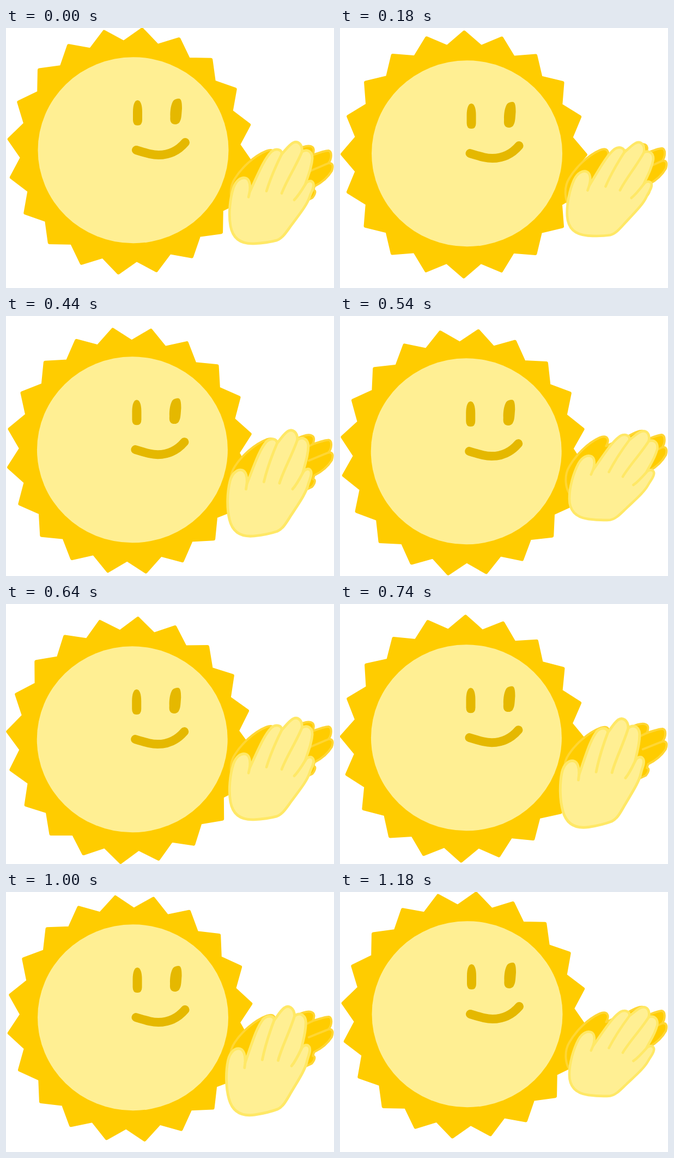
Write an HTML page that moves like this. It is 602x475 px and loops after 1.2 s.

```html
<!DOCTYPE html>
<html lang="en">
<head>
<meta charset="utf-8">
<title>Clapping sun</title>
<style>
  html, body { margin: 0; width: 100%; height: 100%; overflow: hidden; background: #fff; }
  svg { display: block; width: 602px; height: 475px; }
  path, polygon { stroke-linecap: round; stroke-linejoin: round; }
  #rays { fill: #fc0; stroke: #fc0; stroke-width: 6; }
  .face { fill: #ffef93; }
  .eye { fill: #e5b800; }
  .mouth { fill: none; stroke: #e5b800; stroke-width: 16; }
  #back { fill: #fc0; stroke: #ffd633; stroke-width: 4; }
  #front { fill: #ffef93; stroke: #ffe866; stroke-width: 4.8; }
  #back .crease, #front .crease { fill: none; }
</style>
</head>
<body>
<svg viewBox="0 0 602 475">
  <g id="sun">
    <polygon id="rays"/>
    <ellipse class="face" cx="233.5" cy="223.2" rx="175" ry="170"/>
    <path class="eye" d="M241.5 132C247 132 250 141 250 153V168Q250 178 241.5 178Q233 178 233 168V153C233 141 236 132 241.5 132Z"/>
    <path class="eye" d="M317 129C322 129 323 136 323 147C322 160 322 166 319 171C317 176 310 177 306 175C302 173 301 169 301.5 162C301 150 303 139 307 133C310 130 313 129 317 129Z"/>
    <path class="mouth" d="M239 223C262 230 270 232 280 232C300 232 317 223 329 209"/>
  </g>
  <g id="back">
    <path d="M425 333C408 318 410 290 420 275C432 256 455 234 478 225C492 220 497 229 489 241L530 225C540 220 552 214 560 217C566 219 566 225 563 233C574 229 585 225 592 225C599 227 598 240 592 248C600 247 601 253 598 262C592 272 580 283 566 290L564 297C569 297 568 304 562 311L480 350C450 345 435 340 425 333Z"/>
    <path class="crease" d="M563 233L545 242M592 248C582 252 570 257 556 263"/>
  </g>
  <g id="front">
    <path d="M447 300C449 288 447 277 440 274.5C432 272 422 278 417 293C411 312 408 340 412 362C416 384 430 395 455 394C475 393 486 391 497 388C508 384 515 372 524 360C538 341 552 324 557 309C560 299 566 292 564 284C561 277 553 279 549 286C556 266 561 252 562 238C562 226 553 220 543 226C544 212 535 205 526 210C518 215 513 223 506 230C506 222 496 219 487 226C473 240 462 268 447 300Z"/>
    <path class="crease" d="M447 300L445 309M549 286C543 296 537 306 529 314M543 226C533 251 514 280 506 302M506 230C496 250 485 275 478 298"/>
  </g>
</svg>
<script>
  const LOOP = 1200, STEP = 20, LAST = LOOP - STEP, CLAP = 320;
  const TAU = Math.PI * 2;
  const [sun, rays, back, front] = ['sun', 'rays', 'back', 'front'].map(id => document.getElementById(id));
  const move = (el, value) => el.setAttribute('transform', value);

  // Twenty pointed rays around the centre
  rays.setAttribute('points', Array.from({ length: 40 }, (_, i) => {
    const r = i % 2 ? 199.2 : 223.4, a = i * TAU / 40;
    return (r * Math.sin(a)).toFixed(2) + ',' + (-r * Math.cos(a)).toFixed(2);
  }).join(' '));

  function draw(now) {
    const t = Math.floor(now % LOOP / STEP) * STEP;
    const p = t / LAST;
    const bob = Math.abs(Math.sin(Math.PI * p)) ** 1.8;
    const clap = 0.16 - 0.86 * Math.cos(TAU * (t - 71) / CLAP);

    move(sun, `translate(${-1.8 * bob} ${24.5 * bob})`);
    move(rays, `translate(228 224.9) rotate(${5.6 - 36 * p})`);
    move(back, `rotate(${-0.3 - 2.3 * clap} 415 255)`);
    move(front, `translate(575 352) rotate(${10.3 * clap}) scale(${1 - 0.05 * clap}) translate(-575 -352)`);
  }

  const start = performance.now();
  function tick() {
    draw(performance.now() - start);
    requestAnimationFrame(tick);
  }
  tick();
</script>
</body>
</html>
```
